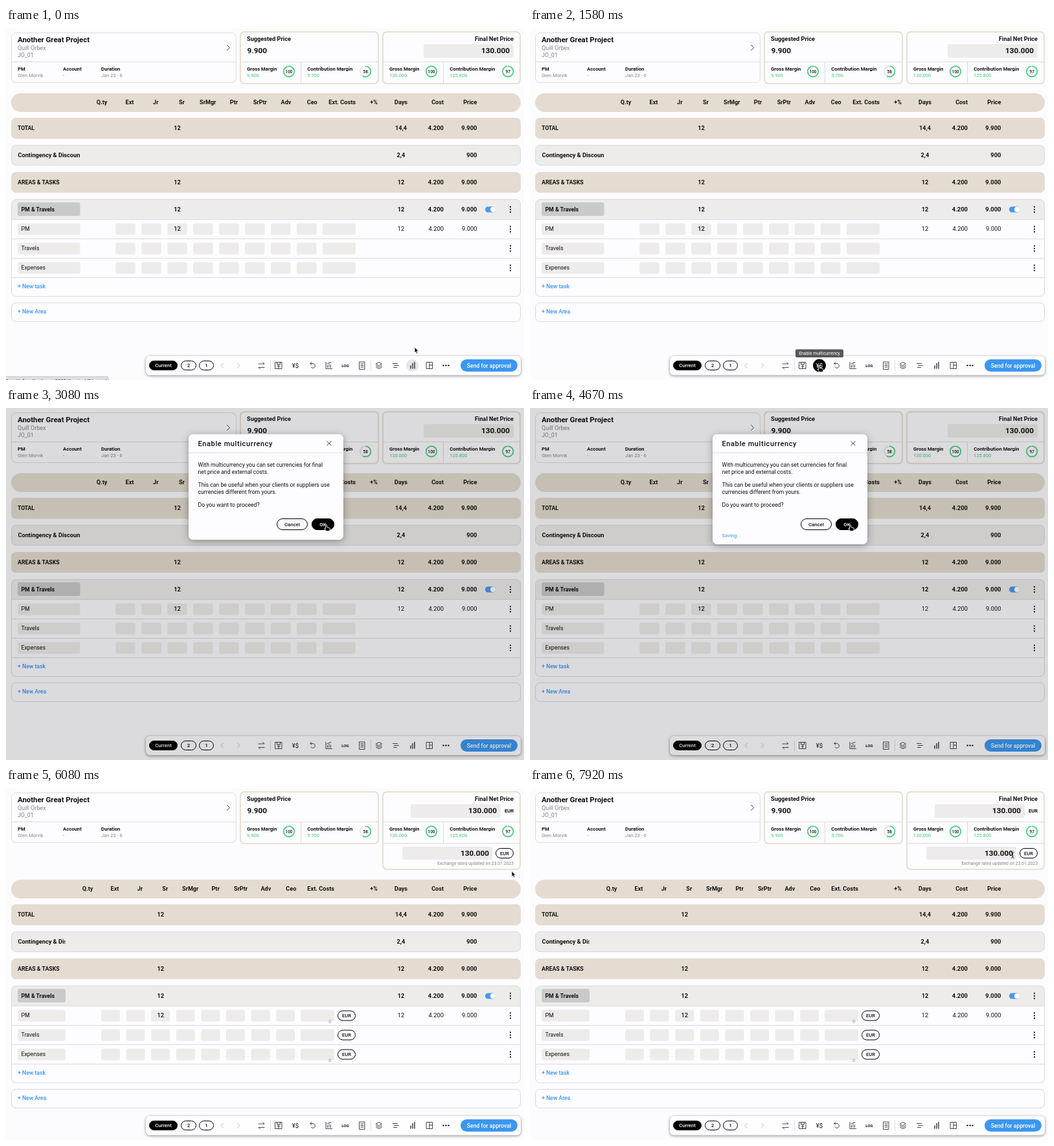
Animation, 800 px wide and 545 px high, one loop 8000 ms. Source, as an HTML page:

```html
<!DOCTYPE html>
<html lang="en">
<head>
<meta charset="utf-8">
<title>Project pricing</title>
<style>
html, body { margin: 0; width: 100%; height: 100%; overflow: hidden; background: #fcfbfe; }
svg { display: block; }
#stage { width: 100vw; height: 100vh; font-family: Roboto, sans-serif; }
text { fill: #111; font-weight: 500; white-space: pre; }
.b { font-weight: 700; }
.r { font-weight: 400; }
.m { text-anchor: middle; }
.e { text-anchor: end; }
.grey { fill: #85848a; font-weight: 400; }
.blue { fill: #3b97f0; }
.green { fill: #43cc78; }
.white { fill: #fff; }
.line { fill: none; stroke: #dcdbdf; }
.gold { fill: #fdfcff; stroke: #e6e0cf; stroke-width: 2; }
.icon { fill: none; stroke: #333; stroke-width: .9; stroke-linecap: round; stroke-linejoin: round; }
.faint { stroke: #b5b4b8; }
.bar { filter: drop-shadow(0 1px 2px #0007); }
.modal { filter: drop-shadow(0 2px 6px #0005); }
</style>
</head>
<body>
<svg id="stage" viewBox="0 0 800 545" preserveAspectRatio="none"></svg>
<script>
const SAND = '#e4dcd0', PALE = '#edecea', BLUE = '#3b97f0', GREEN = '#4cd37f';

const text = (x, y, str, size, cls = '') =>
  `<text x="${x}" y="${y}" font-size="${size}" class="${cls}">${str.replace('&', '&amp;')}</text>`;
const box = (x, y, w, h, r, fill, more = '') =>
  `<rect x="${x}" y="${y}" width="${w}" height="${h}" rx="${r}" fill="${fill}" ${more}/>`;
const path = (d, cls = 'line', more = '') => `<path d="${d}" class="${cls}" ${more}/>`;
const dot = (x, y, r, fill) => `<circle cx="${x}" cy="${y}" r="${r}" fill="${fill}"/>`;
const group = (id, body, more = '') => `<g id="${id}" ${more}>${body}</g>`;
const pill = (x, y, w, h, label, size, dark) =>
  box(x, y, w, h, h / 2, dark ? '#000' : '#fdfcff', 'stroke="#000"') +
  text(x + w / 2, y + h / 2 + size * .36, label, size, dark ? 'm white' : 'm');
const kebab = y => [-4, 0, 4].map(d => dot(779, y + d, 1.15, '#222')).join('');

function ring(x, percent) {
  const len = 2 * Math.PI * 8.2;
  const circle = (color, dash) => `<circle cx="${x}" cy="67.3" r="8.2" fill="none" stroke="${color}"
    stroke-width="1.8" stroke-dasharray="${dash} 99" transform="rotate(-90 ${x} 67.3)"/>`;
  return circle('#e4e3e6', len) + circle(GREEN, len * percent / 100) + text(x, 69.6, '' + percent, 6.4, 'm');
}

const margins = (x, gross, contribution, percents) =>
  text(x, 65.5, 'Gross Margin', 7.7, 'b') + text(x, 75.5, gross, 7.5, 'r green') + ring(x + 65, percents[0]) +
  text(x + 93.2, 65.5, 'Contribution Margin', 7.8, 'b') +
  text(x + 93.2, 75.5, contribution, 7.5, 'r green') + ring(x + 183.2, percents[1]);

function projectCards() {
  const fields = [[18, 'PM', 'Glen Morvik'], [88, 'Account', '-'], [147, 'Duration', 'Jan 23 - 6']];
  return box(8.5, 7.5, 347, 77, 7, '#fdfcff', 'stroke="#dcdbdf"') + path('M9 52.5H355') +
    text(18, 22, 'Another Great Project', 11.4, 'b') +
    text(18, 34, 'Quill Orbex', 9, 'grey') + text(18, 45, 'JO_01', 8.8, 'grey') +
    fields.map(([x, label, value]) =>
      text(x, 65.5, label, 7.7, 'b') + text(x, 75.5, value, 7.5, 'grey')).join('') +
    path('M341.5 26.5l4 4-4 4', 'icon') +
    box(362, 6, 213, 80, 6, '', 'class="gold"') + path('M363 52.5H574M455.5 53V85') +
    text(372, 20.3, 'Suggested Price', 9.2, 'b') + text(372.5, 39, '9.900', 11.8, 'b') +
    margins(372, '9.900', '5.700', [100, 58]);
}

function finalCard(multi) {
  const right = multi ? 764 : 784;
  return box(582, 6, 212, multi ? 120 : 80, 6, '', 'class="gold"') +
    path('M583 52.5H793M675.5 53V85' + (multi ? 'M583 85.5H793' : '')) +
    text(784, 20.3, 'Final Net Price', 9.1, 'b e') +
    box(right - 139, 25, 139, 21, 3, PALE) + text(right - 6, 39, '130.000', 11.8, 'b e') +
    margins(592, '130.000', '125.800', [100, 97]) +
    (multi ? text(784, 38.2, 'EUR', 7.6, 'b e') +
      box(612, 91, 139, 20, 3, PALE) + text(746, 105.3, '130.000', 11.8, 'b e') +
      pill(756.5, 93.5, 27, 15, 'EUR', 7.6) +
      text(784, 119, 'Exchange rates updated on 23.01.2023', 6.8, 'grey e') : '');
}

function table(multi) {
  const first = multi ? 147 : 169.3, step = multi ? 38.6 : 39.95, width = multi ? 29 : 30.5;
  const nameWidth = multi ? 74 : 96.5, srX = first + 2 * step + width / 2;
  const costsX = multi ? 455 : 489, costsW = multi ? 52 : 51;
  const heads = ['Ext', 'Jr', 'Sr', 'SrMgr', 'Ptr', 'SrPtr', 'Adv', 'Ceo'];
  const row = (y, days, cost, price, sr, cls = 'b') =>
    (sr ? text(srX, y, '12', 9.2, 'm ' + (cls === 'b' ? cls : '')) : '') + text(610, y, days, 9.2, 'm ' + cls) +
    text(676, y, cost, 9.4, 'e ' + cls) + text(727.5, y, price, 9.4, 'e ' + cls);

  let out = box(8, 101, 787, 29, 14.5, SAND) +
    text(multi ? 126 : 148, 118, 'Q.ty', 9.1, 'b m') +
    heads.map((h, i) => text(multi ? 168 + 38.9 * i : 191 + 40.25 * i, 118, h, 9.1, 'b m')).join('') +
    text(costsX + costsW, 118, 'Ext. Costs', 9.2, 'b e') + text(568, 118, '+%', 9, 'b m') +
    text(610, 118, 'Days', 9.1, 'b m') + text(676, 118, 'Cost', 9.1, 'b e') + text(727.5, 118, 'Price', 9.1, 'b e') +
    box(8, 139, 787, 32.5, 7, SAND) + text(18, 158, 'TOTAL', 8.6, 'b') + row(158, '14,4', '4.200', '9.900', true) +
    box(8.5, 181.5, 786, 31, 7, PALE, 'stroke="#dad9dc"') +
    `<svg x="18" y="184" width="${nameWidth - .5}" height="26">${text(.5, 16, 'Contingency & Discount', 9.2, 'b')}</svg>` +
    row(200, '2,4', '', '900', false) +
    box(8, 223, 787, 32, 7, SAND) + text(18, 241.5, 'AREAS & TASKS', 8.75, 'b') +
    row(241.5, '12', '4.200', '9.000', true);

  out += box(8.5, 265.5, 786, 150, 7, '#fdfcff') +
    path('M9 296V272q0-6.500 6.500-6.500H788q6.500 0 6.500 6.500V296Z', '', `fill="${PALE}"`) +
    box(8.5, 265.5, 786, 150, 7, 'none', 'stroke="#dad9dc"') +
    path('M9 296.500H794M9 326.500H794M9 356.500H794M9 386.500H794') +
    box(18, 270, nameWidth, 21, 3, '#cbcaca') + text(23.5, 283.6, 'PM & Travels', 8.7, 'b') +
    row(283.6, '12', '4.200', '9.000', true) +
    box(740, 276.5, 16, 9, 4.5, '#4b98ea') + dot(752, 281, 4, '#fff') + kebab(281);

  ['PM', 'Travels', 'Expenses'].forEach((name, i) => {
    const y = 302.5 + 30 * i;
    out += box(18, y, nameWidth, 18, 3, PALE) + text(23.5, y + 11.7, name, 8.8, 'r') + kebab(y + 9);
    heads.forEach((_, k) => out += box(first + step * k, y, width, 18, 3, PALE));
    out += box(costsX, y, costsW, 18, 3, PALE);
    if (multi) {
      out += pill(512.5, y + 1.5, 27, 15, 'EUR', 7.6);
      if (i !== 1) out += text(500, y + 20, '0', 6.6, 'grey m');
    }
  });
  out += row(314.2, '12', '4.200', '9.000', true, 'r') +
    text(18, 403.3, '+ New task', 8.7, 'blue') +
    box(8.5, 425.5, 786, 29, 7, '#fdfcff', 'stroke="#dad9dc"') + text(18, 442.3, '+ New Area', 8.6, 'blue');
  return `<g transform="translate(0 ${multi ? 41 : 0})">${out}</g>`;
}

const scene = multi => finalCard(multi) + table(multi);

function toolbar() {
  const icons = [
    'M390 520h9l-2.500-2.500M399 525.500h-9l2.500 2.500',
    'M416 517.500h10v10h-10zM418.500 517.500v3.500h5v-3.500M421 521v6.500M419 524h4',
    'M470 519.500h4a3.500 3.500 0 1 1-3 5.500M472 517.500l-2.200 2 2.200 2',
    'M494 517.500v10h9.500M496.500 525.500v-3M499 525.500v-5M501.500 525.500v-3.500M496 520l3-1.500 3-1',
    'M546 517h8v11.500h-8zM548 520h4M548 522.500h4M548 525h4',
    'M571.500 520l4.500-2.500 4.500 2.500-4.500 2.500zM571.500 522.700l4.500 2.500 4.500-2.500M571.500 525.200l4.500 2.500 4.500-2.500',
    'M597.500 519.500h7M599.500 522.500h7M598.500 525.500h5',
    'M649.500 517.500h9v10h-9zM654 517.500v10M654 522h4.500'
  ];
  return box(216, 508, 579, 29.5, 6, '#fefdff', 'class="bar"') +
    pill(221.5, 515.5, 43, 14, 'Current', 7.7, true) +
    pill(270.5, 515.5, 23, 14, '2', 8) + pill(298.5, 515.5, 22, 14, '1', 8) +
    path('M335.500 519l-3.500 3.500 3.500 3.500M357.500 519l3.500 3.500-3.500 3.500', 'icon faint') +
    path('M408.500 514V531M563.500 514V531') +
    group('barsHover', dot(627.5, 522.5, 9.5, '#e6e5e8')) +
    path(icons.join(''), 'icon') +
    path('M625 523v4M628 519.500v7.500M631 517.500v9.500', 'icon', 'style="stroke-width:1.400"') +
    text(447, 526, '¥$', 9.6, 'r m') + text(524, 525, 'LOG', 6.1, 'b m') +
    [675.5, 679.5, 683.5].map(x => dot(x, 522.5, 1.2, '#222')).join('') +
    box(702, 513, 88, 19, 9.5, BLUE) + text(746, 525.6, 'Send for approval', 8.7, 'm white');
}

function modal() {
  const lines = [[91, 'With multicurrency you can set currencies for final'], [102, 'net price and external costs.'],
    [122.3, 'This can be useful when your clients or suppliers use'], [133, 'currencies different from yours.'],
    [153.4, 'Do you want to proceed?']];
  return '<rect id="panel" x="282" y="40.500" width="239" rx="7" fill="#fdfcff" class="modal"/>' +
    `<g style="letter-spacing:.6px">${text(296.5, 58.6, 'Enable multicurrency', 11)}</g>` +
    path('M495.700 51.500l6.600 6.600M502.300 51.500l-6.600 6.600', 'icon') + path('M282 69.500H521') +
    lines.map(([y, s]) => text(296.5, y, s, 8.7, 'r')).join('') +
    pill(418.5, 171.5, 47, 17, 'Cancel', 7.8) + pill(472.5, 171.5, 34, 17, 'OK', 7.8) +
    group('okHover', pill(472.5, 171.5, 34, 17, 'OK', 7.8, true)) +
    group('saving', text(296.5, 200, 'Saving...', 7.7, 'r blue'));
}

const outline = 'stroke="#fff" stroke-width=".9" stroke-linejoin="round"';
document.getElementById('stage').innerHTML =
  box(0, 0, 800, 545, 0, '#fcfbfe') + projectCards() +
  group('single', scene(false)) + group('multi', scene(true)) + toolbar() +
  group('status', box(-4, 539.5, 162.5, 12, 3, '#dedde0', 'stroke="#bbb" stroke-width=".6"') +
    text(-1, 548.5, 'ttps:\/\/inf.method.wow:3000/#project/9/export', 7.6, 'r')) +
  group('yenHover', dot(447, 522.5, 10, '#000') + group('yen', text(447, 526, '¥$', 9.6, 'r m white')) +
    box(410, 497.5, 74, 12.5, 2, '#58575a') + text(447, 506.2, 'Enable multicurrency', 6.85, 'r m white')) +
  group('shade', box(0, 0, 800, 545, 0, '#000', 'opacity=".135"') + modal()) +
  group('cursor',
    group('arrow', path('M0 0V9l2-1.800 1.500 3.300 1.600-.7-1.500-3.200H6.300Z', '', outline)) +
    group('hand', path('M-1 0q1-1.200 2 0V3.500l4 1q1 .4.9 1.500L5.300 9.500H.2L-3 5.800q.4-1.200 2 0Z', '', outline)) +
    group('beam', path('M-2-4.500q2 0 2 1.500V3q0 1.500-2 1.500M2-4.500q-2 0-2 1.500M0 3q0 1.500 2 1.500M-1 1.500h2', 'icon')));

const el = id => document.getElementById(id);
const show = (id, on) => el(id).style.display = on ? '' : 'none';

// [time, x, y] stops of the pointer
const stops = [[0, 631, 494], [500, 631, 494], [1300, 447, 523], [2170, 447, 523], [2900, 494.5, 181],
  [5150, 494.5, 181], [5950, 781, 128.5], [6400, 781, 128.5], [7080, 745.5, 104], [8000, 745.5, 104]];

function pointer(t) {
  const i = stops.findIndex(s => s[0] > t), [t0, x0, y0] = stops[i - 1], [t1, x1, y1] = stops[i];
  const p = (t - t0) / (t1 - t0), k = p * p * (3 - 2 * p);
  return [x0 + (x1 - x0) * k, y0 + (y1 - y0) * k];
}

function draw(t) {
  const open = t >= 1670 && t < 5000, saving = open && t >= 3900;
  const [x, y] = pointer(t);
  const onYen = t < 2400 && Math.hypot(x - 447, y - 522.5) < 12;
  const onOk = open && x > 472 && x < 507 && y > 171 && y < 189;
  const onInput = t > 6000 && x > 612 && x < 751 && y > 91 && y < 111;
  const hand = onOk || onYen && !open;

  show('single', t < 5000);
  show('multi', t >= 5000);
  show('status', t < 500);
  show('barsHover', t < 80);
  show('yenHover', onYen);
  show('yen', !open);
  show('shade', open);
  show('okHover', onOk);
  show('saving', saving);
  el('panel').setAttribute('height', saving ? 170.5 : 163.5);
  show('hand', hand);
  show('beam', onInput);
  show('arrow', !hand && !onInput);
  el('cursor').setAttribute('transform', `translate(${x} ${y})`);
}

function tick(now) {
  draw(now % 8000);
  requestAnimationFrame(tick);
}
draw(0);
requestAnimationFrame(tick);
</script>
</body>
</html>
```
